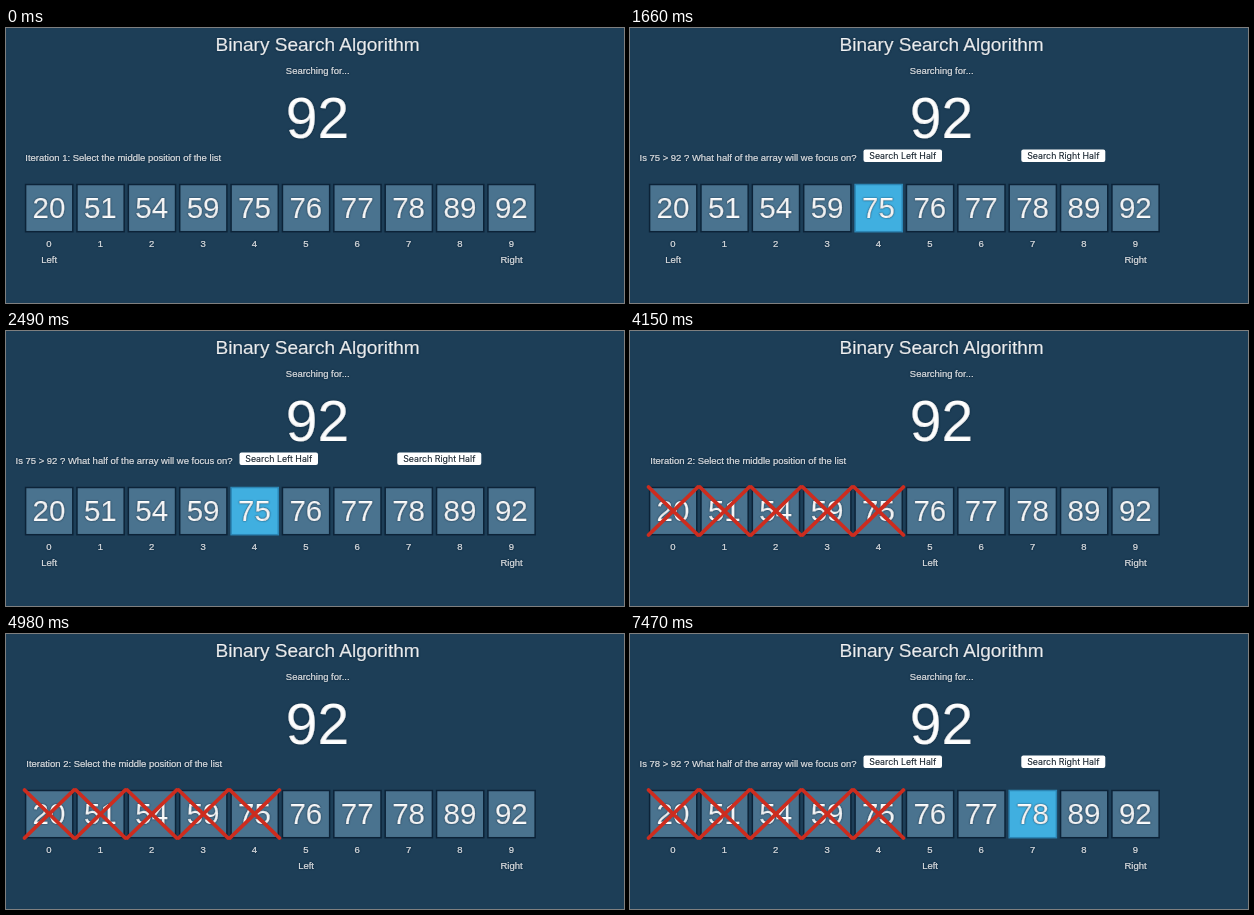
An HTML page that plays this animation: 618x275 px, repeating every 8000 ms.

```html
<!DOCTYPE html>
<html lang="en">
<head>
<meta charset="utf-8">
<title>Binary Search Algorithm</title>
<style>
  html, body { margin: 0; width: 100%; height: 100%; overflow: hidden; background: #1d3e57; }
  svg { display: block; width: 100vw; height: 100vh; }
  text {
    font-family: "Liberation Sans", Arial, sans-serif; font-size: 9.48px;
    fill: #fff; stroke: #fff; stroke-width: .22px;
    text-shadow: 0 0 1.5px #0c2338;
  }
  .mid { text-anchor: middle; }
  .button text {
    font-family: Inter, sans-serif; font-size: 8.8px;
    fill: #14202b; stroke: #14202b; stroke-width: .1px; text-shadow: none;
  }
</style>
</head>
<body>
<svg id="stage" viewBox="0 0 618 275"></svg>
<script>
const stage = document.getElementById("stage");
const values = [20, 51, 54, 59, 75, 76, 77, 78, 89, 92];
const target = 92, loop = 8000, pitch = 51.37;
const steps = [
  { at: 0, left: 0, round: 1 },
  { at: 1660, left: 0, mid: 4 },
  { at: 4150, left: 5, round: 2 },
  { at: 7470, left: 5, mid: 7 }
];

function add(parent, tag, attrs, content) {
  const node = document.createElementNS("http://www.w3.org/2000/svg", tag);
  for (const key in attrs) node.setAttribute(key, attrs[key]);
  if (content !== undefined) node.textContent = content;
  parent.appendChild(node);
  return node;
}

function label(parent, x, y, content, size) {
  const attrs = { x, y, class: "mid" };
  if (size) attrs.style = `font-size:${size}px`;
  return add(parent, "text", attrs, content);
}

function button(x, width, content) {
  const g = add(stage, "g", { class: "button" });
  add(g, "rect", { x, y: 121.5, width, height: 12.6, rx: 2, fill: "#fff" });
  label(g, x + width / 2, 131, content);
  return g;
}

const show = (node, on) => node.setAttribute("visibility", on ? "visible" : "hidden");
const centre = i => 43.2 + i * pitch;

add(stage, "rect", { width: 618, height: 275, fill: "#1d3e57" });
label(stage, 311.6, 22.7, "Binary Search Algorithm", 19.05);
label(stage, 311.7, 46.3, "Searching for...");
label(stage, 311.5, 109.8, target, 57);
const message = add(stage, "text", { y: 132.5 });
const buttons = [button(233.5, 78.5, "Search Left Half"), button(391.3, 84, "Search Right Half")];

const cells = values.map((value, i) => {
  const x = centre(i);
  const box = add(stage, "rect", { x: x - 23.6, y: 156.5, width: 47.2, height: 47.2, "stroke-width": 1.5 });
  label(stage, x - 0.2, 190, value, 29.5);
  label(stage, x - 0.2, 219.1, i);
  return box;
});

const crosses = values.map((_, i) => add(stage, "path", {
  d: `M${centre(i) - 24.7} 156l49.4 48m0-48l-49.4 48`,
  fill: "none", stroke: "#cd2c1e", "stroke-width": 3.8, "stroke-linecap": "round"
}));

const leftLabel = label(stage, 0, 234.8, "Left");
label(stage, centre(9), 234.8, "Right");

let current;
function draw(time) {
  const step = steps.filter(s => s.at <= time).pop();
  if (step === current) return;
  current = step;
  const asking = step.mid !== undefined;
  message.textContent = asking
    ? `Is ${values[step.mid]} > ${target} ? What half of the array will we focus on?`
    : `Iteration ${step.round}: Select the middle position of the list`;
  message.setAttribute("x", asking ? 9.5 : 18.3 + step.round);
  buttons.forEach(b => show(b, asking));
  cells.forEach((box, i) => {
    const active = i === step.mid;
    box.setAttribute("fill", active ? "#40afe0" : "#4a738f");
    box.setAttribute("stroke", active ? "#2c86b5" : "#0c2338");
  });
  crosses.forEach((cross, i) => show(cross, i < step.left));
  leftLabel.setAttribute("x", centre(step.left));
}

const start = performance.now();
function tick() {
  draw((performance.now() - start) % loop);
  requestAnimationFrame(tick);
}
draw(0);
requestAnimationFrame(tick);
</script>
</body>
</html>
```
